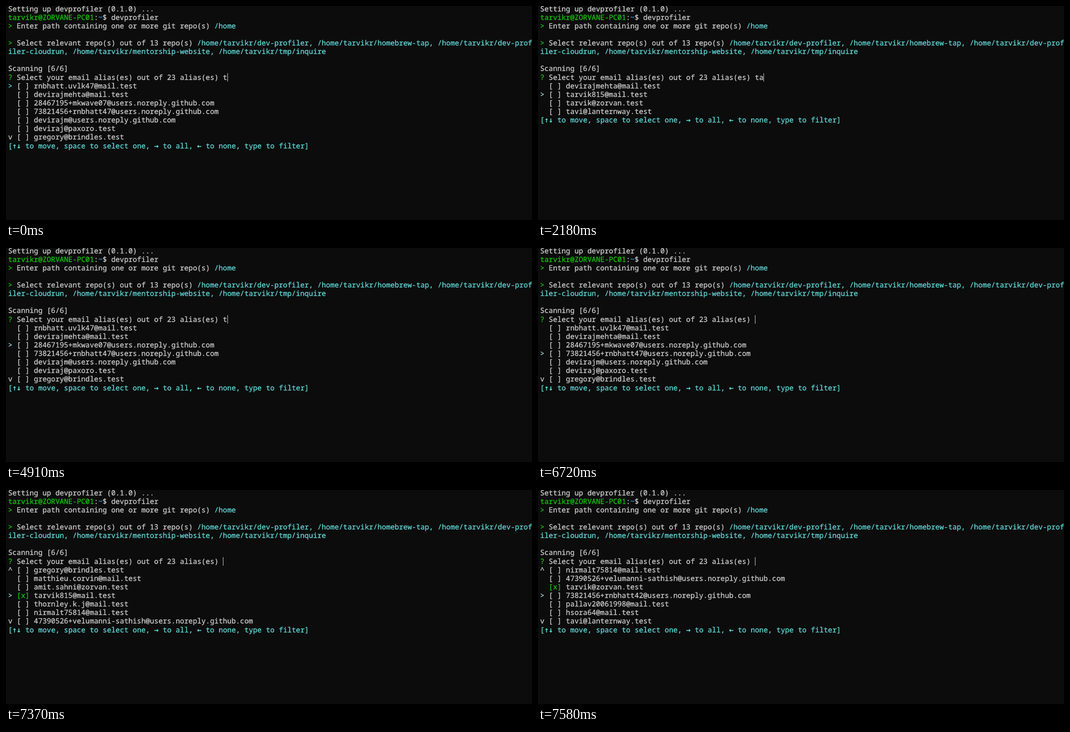
Recreate the animation shown at these times as an HTML page. Size 1171 by 478 pixels, loop 8000 ms.

```html
<!DOCTYPE html>
<html lang="en">
<head>
<meta charset="utf-8">
<title>Terminal alias picker</title>
<style>
  html, body { margin: 0; width: 100%; height: 100%; overflow: hidden; background: #0c0c0c; }
  #term {
    position: absolute; inset: 0; overflow: hidden; color: #ccc;
    font: 15.943px "Noto Sans Mono", "DejaVu Sans Mono", monospace;
    font-variant-ligatures: none;
    text-rendering: geometricPrecision;
    -webkit-text-stroke: 0.35px currentColor;
  }
  .row { position: absolute; left: 4.7px; line-height: 19.13px; height: 19.13px; white-space: pre; }
  .green { color: #16c60c; }
  .cyan { color: #61d6d6; }
  .pale { color: #a9d6d6; }
  .blue { color: #3a96dd; }
  .arrow { font-family: "DejaVu Sans Mono", monospace; line-height: 0; -webkit-text-stroke-width: 0.6px; }
  #bar { position: absolute; top: 150px; width: 1px; height: 19px; background: #ddd; }
</style>
</head>
<body>
<div id="term"><div id="bar"></div></div>
<script>
const LOOP = 8000, ROW = 19.13, TOP = -3.5, CELL = 9.566, LEFT = 4.7;
const PROMPT_ROW = 8, PAGE = 7, MIDDLE = 3, ROWS = 17;
const PROMPT = 'Select your email alias(es) out of 23 alias(es) ';
const HELP = '[↑↓ to move, space to select one, → to all, ← to none, type to filter]';
const HOME = '/home/tarvikr/';
const NOREPLY = '@users.noreply.github.com';

const aliases = [
  'rnbhatt.uvlk47@mail.test',
  'devirajmehta@mail.test',
  '28467195+mkwave07' + NOREPLY,
  '73821456+rnbhatt47' + NOREPLY,
  'devirajm' + NOREPLY,
  'deviraj@paxoro.test',
  'gregory@brindles.test',
  'matthieu.corvin@mail.test',
  'amit.sahni@zorvan.test',
  'tarvik815@mail.test',
  'thornley.k.j@mail.test',
  'nirmalt75814@mail.test',
  '47390526+velumanni-sathish' + NOREPLY,
  'tarvik@zorvan.test',
  '73821456+rnbhatt42' + NOREPLY,
  'pallav20061998@mail.test',
  'hsora64@mail.test',
  'tavi@lanternway.test'
];

// Each step changes some of the state from its time on.
const steps = [
  [0, { query: 't', at: 0, picked: 0, bar: true, tint: 'cyan' }],
  [400, { bar: false }],
  [600, { query: 'ta', bar: true }],
  [1260, { bar: false }],
  [1850, { bar: true }],
  [2180, { at: 1, tint: 'pale' }],
  [2860, { bar: false }],
  [3400, { picked: 1, bar: true }],
  [3780, { at: 2 }],
  [4180, { picked: 2 }],
  [4910, { query: 't' }],
  [5040, { query: '' }],
  [5640, { bar: false }],
  [6240, { bar: true }],
  [6720, { at: 3 }],
  [7240, { at: 5 }],
  [7300, { at: 7 }],
  [7370, { at: 9 }],
  [7430, { at: 11 }],
  [7500, { at: 13 }],
  [7580, { at: 14 }]
];
const pickOrder = ['tarvik815@mail.test', 'tarvik@zorvan.test'];

const term = document.getElementById('term');
const bar = document.getElementById('bar');
const rows = Array.from({ length: ROWS }, (_, i) => {
  const row = document.createElement('div');
  row.className = 'row';
  row.style.top = TOP + i * ROW + 'px';
  return term.appendChild(row);
});

// Parts are plain strings or [class, text] pairs.
function write(i, ...parts) {
  rows[i].replaceChildren(...parts.map(part => {
    if (typeof part === 'string') return part;
    const span = document.createElement('span');
    span.className = part[0];
    span.textContent = part[1];
    return span;
  }));
}

const helpParts = HELP.split(/([↑↓→←]+)/)
  .map((text, i) => [i % 2 ? 'cyan arrow' : 'cyan', text]);

function drawHeader() {
  write(0, 'Setting up devprofiler (0.1.0) ...');
  write(1, ['green', 'tarvikr@ZORVANE-PC01'], ':', ['blue', '~'], '$ devprofiler');
  write(2, ['green', '>'], ' Enter path containing one or more git repo(s) ', ['cyan', '/home']);
  write(4, ['green', '>'], ' Select relevant repo(s) out of 13 repo(s) ',
    ['cyan', `${HOME}dev-profiler, ${HOME}homebrew-tap, ${HOME}dev-prof`]);
  write(5, ['cyan', `iler-cloudrun, ${HOME}mentorship-website, ${HOME}tmp/inquire`]);
  write(7, 'Scanning [6/6]');
}

function drawPicker({ query, at, picked, bar: lit, tint }) {
  write(PROMPT_ROW, ['green', '?'], ' ' + PROMPT + query);
  bar.style.left = Math.round(LEFT + (2 + PROMPT.length + query.length) * CELL) + 'px';
  bar.style.visibility = lit ? 'visible' : 'hidden';

  const found = aliases.filter(name => name.includes(query));
  const more = found.length > PAGE;
  const first = more ? Math.max(0, at - MIDDLE) : 0;
  const shown = found.slice(first, first + PAGE);
  const chosen = pickOrder.slice(0, picked);

  shown.forEach((name, i) => {
    const mark = first + i === at ? [tint, '>']
      : i === 0 && first > 0 ? '^'
      : i === PAGE - 1 && more ? 'v' : ' ';
    const box = chosen.includes(name) ? ['green', '[x]'] : '[ ]';
    write(PROMPT_ROW + 1 + i, mark, ' ', box, ' ' + name);
  });
  const end = PROMPT_ROW + 1 + shown.length;
  write(end, ...helpParts);
  for (let i = end + 1; i < ROWS; i++) write(i);
}

let current = -1;
function render(time) {
  const passed = steps.filter(([start]) => start <= time);
  if (passed.length === current) return;
  current = passed.length;
  drawPicker(Object.assign({}, ...passed.map(([, change]) => change)));
}

const begin = performance.now();
function tick() {
  render((performance.now() - begin) % LOOP);
  requestAnimationFrame(tick);
}
drawHeader();
tick();
</script>
</body>
</html>
```
